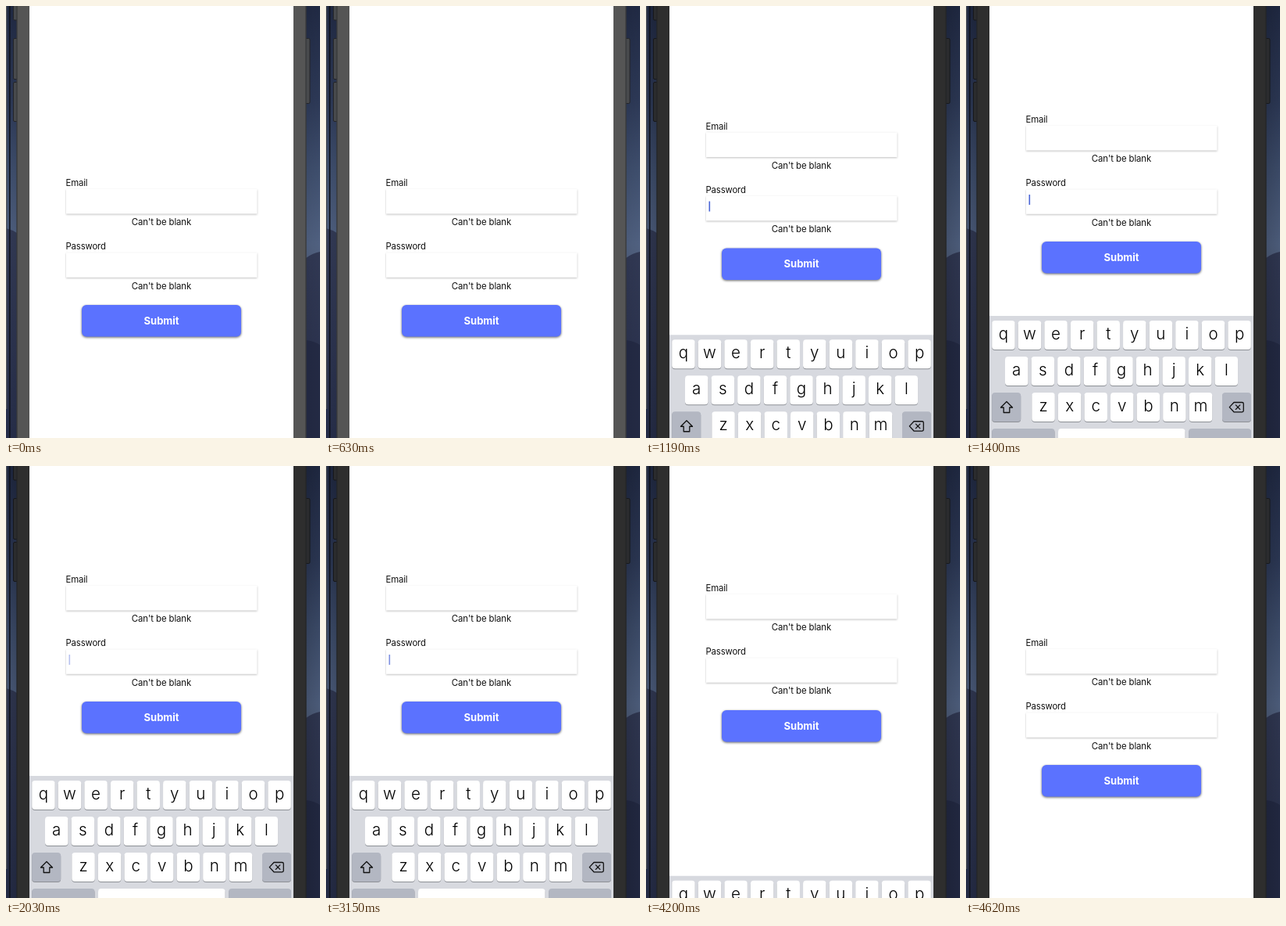
An HTML page for the animation above (4.69 s loop, 402 px wide and 552 px high).

```html
<!DOCTYPE html>
<html lang="en">
<head>
<meta charset="utf-8">
<title>Login form</title>
<style>
  html, body { margin: 0; width: 100%; height: 100%; overflow: hidden; background: #fff; }
  svg { display: block; width: 402px; height: 552px; font-family: Inter, Roboto, sans-serif; }
  .label { font-size: 11.3px; letter-spacing: -.12px; fill: #111; }
  .error { font-size: 11.4px; letter-spacing: -.1px; fill: #111; }
  .submit { font-size: 13.1px; font-weight: 700; letter-spacing: -.05px; fill: #fff; }
  .key { font-size: 20.6px; font-weight: 300; fill: #000; }
  .mid { text-anchor: middle; }
  .field { filter: drop-shadow(0 1.9px 1.2px rgba(0, 0, 0, .25)); }
  .button { filter: drop-shadow(0 1.2px 1.5px rgba(0, 0, 0, .6)); }
  .icon { fill: none; stroke: #111; stroke-width: 1.3; stroke-linejoin: round; stroke-linecap: round; }
  .bezel { fill: #555; }
  .side { fill: #484a4d; stroke: #242529; }
  .shade { opacity: .12; }
  .active .bezel { fill: #2e2e2e; }
  .active .side { fill: #2b2c2e; stroke: #17181b; }
  .active .shade { opacity: .22; }
</style>
</head>
<body>
<svg id="stage" viewBox="0 0 402 552">
  <defs>
    <linearGradient id="sky" x2="0" y2="1">
      <stop offset="0" stop-color="#232d49"/>
      <stop offset=".22" stop-color="#303d5d"/>
      <stop offset=".38" stop-color="#435475"/>
      <stop offset=".55" stop-color="#56688a"/>
      <stop offset=".6" stop-color="#566684"/>
    </linearGradient>
    <linearGradient id="dune" x2="0" y2="1">
      <stop offset="0" stop-color="#363e5b"/>
      <stop offset="1" stop-color="#2a3250"/>
    </linearGradient>
    <linearGradient id="fadeR">
      <stop offset="0"/>
      <stop offset="1" stop-opacity=".6"/>
    </linearGradient>
    <linearGradient id="fadeL">
      <stop offset="0" stop-opacity=".6"/>
      <stop offset="1"/>
    </linearGradient>
    <clipPath id="screen"><rect x="30" width="338" height="552"/></clipPath>
  </defs>
  <g id="phone">
    <rect width="402" height="552" fill="url(#sky)"/>
    <path d="M0 284Q8 286 14 290V552H0ZM384 322Q392 316 402 314V552H384Z" fill="url(#dune)"/>
    <path d="M384 427Q394 428 402 433V552H384Z" fill="#262d49"/>
    <g class="shade">
      <rect width="14" height="552" fill="url(#fadeL)"/>
      <rect x="384" width="18" height="552" fill="url(#fadeR)"/>
    </g>
    <rect width="1.3" height="515" fill="#50535a"/>
    <rect x="4" width="1.6" height="552" fill="#10131c"/>
    <g id="sides"></g>
    <path d="M13.5 0H30V552H13.5ZM368 0H384.5V552H368Z" class="bezel"/>
    <path d="M14 0V552M384 0V552" stroke="#1b1c1f" stroke-opacity=".65"/>
  </g>
  <rect x="30" width="338" height="552" fill="#fff"/>
  <g id="form"></g>
  <g clip-path="url(#screen)"><g id="keys"></g></g>
</svg>
<script>
const LOOP = 4690, TICK = 70;
const LIFT = 81, KEYS_TRAVEL = 230, RATE = 0.0139, SETTLE = 460;
const FOCUS = 770, CARET_ON = 840, CARET_OFF = 4060;
const RISE = 915, KEYS_FALL = 4066, FORM_FALL = 4154;
// caret opacity: [time, value]
const BLINK = [[0, 1], [1960, 1], [2030, .4], [2310, 0], [2540, 0], [2800, 1],
  [3080, 1], [3150, .72], [3430, 0], [3600, 0], [3850, 1], [LOOP, 1]];

const $ = id => document.getElementById(id);
const rect = (x, y, w, h, fill, r = 0, cls = '') =>
  `<rect x="${x}" y="${y}" width="${w}" height="${h}" rx="${r}" fill="${fill}" class="${cls}"/>`;
const text = (x, y, str, cls) => `<text x="${x}" y="${y}" class="${cls}">${str}</text>`;

const field = (y, name) =>
  text(76.5, y, name, 'label') +
  rect(77, y + 4, 244.5, 31.5, '#fff', 0, 'field') +
  text(199, y + 50.2, "Can't be blank", 'error mid');

const key = (x, y, w, fill = '#fff') =>
  rect(x, y + 1, w, 37, '#8d9096', 4) + rect(x, y, w, 37, fill, 4);

const row = (letters, x, y) => [...letters].map((c, i) => {
  const left = x + i * 33.57;
  return key(left, y, 29.5) + text(left + 14.75, y + 24, c, 'key mid');
}).join('');

$('sides').innerHTML = [[9.5, -8, 26], [9.5, 41.5, 52], [9.5, 97.5, 50], [382, 41.5, 83]]
  .map(([x, y, h]) => rect(x, y, 7, h, '', 1.5, 'side')).join('');

$('form').innerHTML = field(230, 'Email') + field(311.3, 'Password') +
  rect(97, 382, 204, 40.5, '#5b72ff', 6, 'button') +
  text(199, 406.8, 'Submit', 'submit mid') +
  '<rect id="caret" x="80.5" y="322" width="1.6" height="13" fill="#4b66d6"/>';

const GREY = '#b3b7c2';
$('keys').innerHTML = rect(30, 396, 338, 260, '#d7d9df') +
  row('qwertyuiop', 33.2, 402) + row('asdfghjkl', 50, 448) + row('zxcvbnm', 84.3, 494) +
  key(33.2, 494, 37, GREY) + key(328, 494, 37, GREY) +
  key(33.2, 540, 80.3, GREY) + key(118, 540, 162.5) + key(285.2, 540, 79.8, GREY) +
  '<path class="icon" d="M52 505.5L59.5 513H55.8V519.5H48.2V513H44.5Z"/>' +
  '<path class="icon" d="M343 506.5H353.5Q355.3 506.5 355.3 508.3V517Q355.3 518.8 353.5 518.8H343L337.3 512.6ZM345.4 509.9L350.8 515.4M350.8 509.9L345.4 515.4"/>';

// critically damped spring, 0 to 1
const spring = ms => {
  if (ms > SETTLE) return 1;
  const x = Math.max(0, ms) * RATE;
  return 1 - (1 + x) * Math.exp(-x);
};

const sample = (steps, t) => {
  const i = steps.findIndex(s => s[0] > t);
  const [t0, a] = steps[i - 1], [t1, b] = steps[i];
  return a + (b - a) * (t - t0) / (t1 - t0);
};

const shift = (id, y) => $(id).setAttribute('transform', `translate(0 ${y.toFixed(2)})`);

function draw(t) {
  const up = spring(t - RISE);
  shift('form', -LIFT * (up - spring(t - FORM_FALL)));
  shift('keys', KEYS_TRAVEL * (1 - up + spring(t - KEYS_FALL)));
  $('phone').setAttribute('class', t >= FOCUS ? 'active' : '');
  const shown = t >= CARET_ON && t < CARET_OFF;
  $('caret').setAttribute('opacity', shown ? sample(BLINK, t) : 0);
}

const start = performance.now();
function frame() {
  const t = (performance.now() - start) % LOOP;
  draw(Math.floor(t / TICK) * TICK);
  requestAnimationFrame(frame);
}
frame();
</script>
</body>
</html>
```
